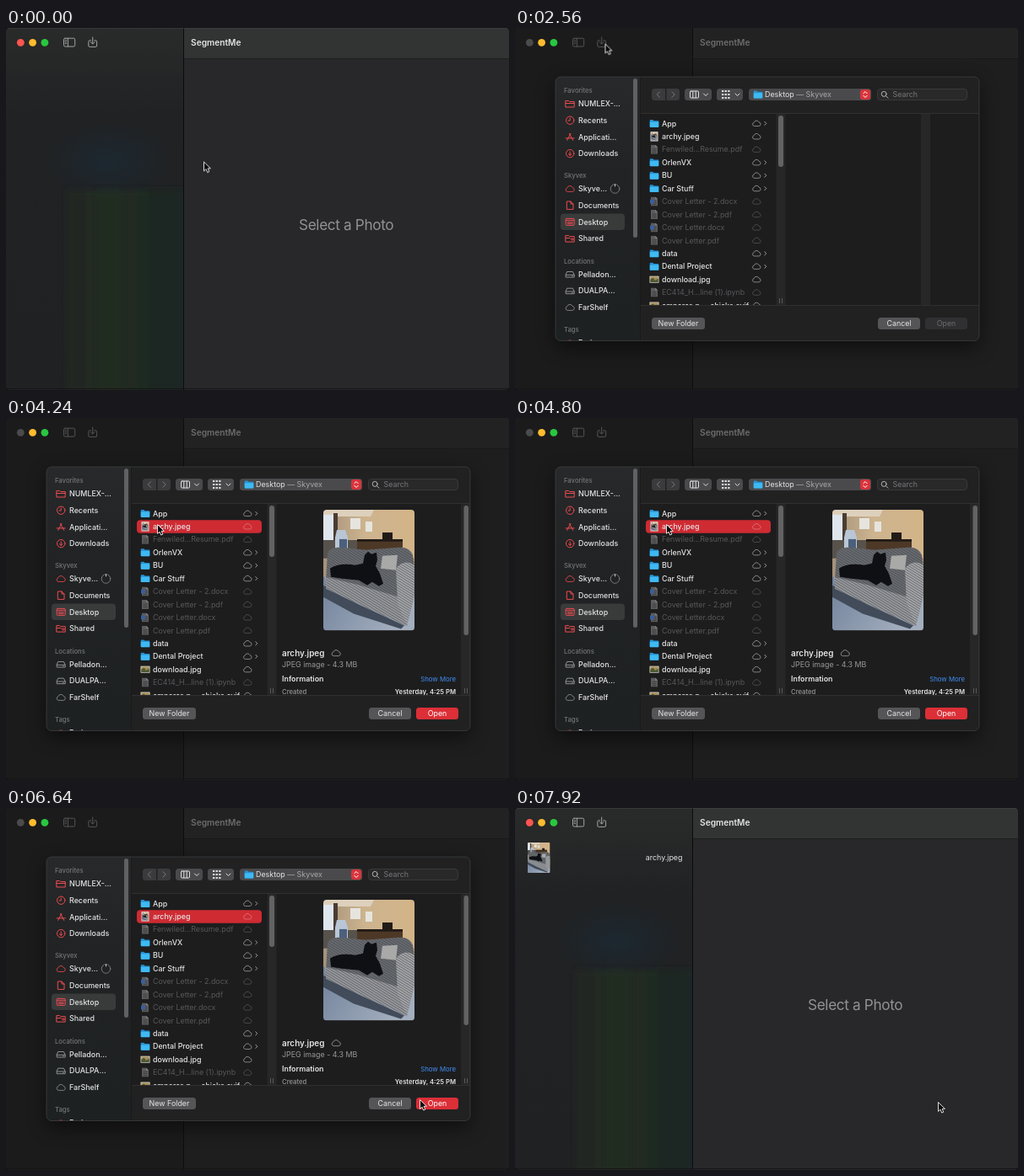
An HTML page for the animation above (8 s loop, 596 px wide and 430 px high).

```html
<!DOCTYPE html>
<html lang="en">
<head>
<meta charset="utf-8">
<title>Photo import</title>
<style>
html, body { margin: 0; width: 100%; height: 100%; overflow: hidden; background: #1e1e1f; }
svg { display: block; width: 596px; height: 430px; font: 400 8.9px Inter, Roboto, sans-serif; }
text { fill: #e4e4e5; white-space: pre; }
.b { font-weight: 600; }
.m { font-weight: 500; }
.gray { fill: #98989a; }
.off { fill: #58585a; }
.head { font-size: 7.7px; font-weight: 500; fill: #747577; }
.small { font-size: 7.7px; }
.mid { text-anchor: middle; }
.end { text-anchor: end; }
.title { font-size: 10.2px; font-weight: 600; }
.prompt { font-size: 17.2px; letter-spacing: -.35px; fill: #929294; }
.line { fill: none; stroke-width: 1; stroke-linecap: round; stroke-linejoin: round; }

.cursor, .hover, .modal, .sheet, .picked, .empty, .preview, .row { animation: 8s linear infinite; }
.cursor { animation-name: travel; }
.hover { animation-name: hover; }
.modal { animation-name: modal; }
.sheet { animation-name: sheet; transform-origin: 299px 215px; }
.picked { animation-name: picked; }
.preview { animation-name: preview; }
.empty { animation-name: empty; }
.row { animation-name: row; }

@keyframes travel {
  0%, 0.9% { transform: translate(234px, 158.5px); }
  1% { transform: translate(222px, 148px); }
  2% { transform: translate(172px, 102px); }
  3%, 4.9% { transform: translate(131px, 66px); }
  5%, 6.9% { transform: translate(115px, 42px); }
  7% { transform: translate(111px, 30px); }
  10%, 34% { transform: translate(106.5px, 18.5px); animation-timing-function: ease-in-out; }
  44%, 61% { transform: translate(179px, 126px); animation-timing-function: ease-in-out; }
  71%, 73% { transform: translate(288px, 197px); animation-timing-function: ease-in-out; }
  82%, 84% { transform: translate(490px, 346px); animation-timing-function: ease-in-out; }
  88%, 100% { transform: translate(501px, 349px); }
}
@keyframes hover { 0%, 7.9% { opacity: 0; } 8%, 29% { opacity: 1; } 30%, 100% { opacity: 0; } }
@keyframes modal { 0%, 28.9% { opacity: 0; } 31%, 95% { opacity: 1; } 97%, 100% { opacity: 0; } }
@keyframes sheet {
  0%, 28.9% { opacity: 0; transform: scale(.94); }
  31.5%, 95% { opacity: 1; transform: none; }
  97%, 100% { opacity: 0; transform: scale(.97); }
}
@keyframes picked { 0%, 51.9% { opacity: 0; } 52%, 100% { opacity: 1; } }
@keyframes empty { 0%, 51.9% { opacity: 1; } 52%, 100% { opacity: 0; } }
@keyframes preview { 0%, 52.9% { opacity: 0; } 53%, 100% { opacity: 1; } }
@keyframes row { 0%, 96.9% { opacity: 0; } 97%, 100% { opacity: 1; } }
</style>
</head>
<body>
<svg viewBox="0 0 596 430">
  <defs>
    <linearGradient id="side" x2="0" y2="1">
      <stop stop-color="#292a2a"/><stop offset=".1" stop-color="#262727"/>
      <stop offset=".24" stop-color="#202224"/><stop offset="1" stop-color="#202122"/>
    </linearGradient>
    <linearGradient id="green">
      <stop stop-color="#202622"/><stop offset=".3" stop-color="#212b21"/>
      <stop offset=".5" stop-color="#202c21"/><stop offset=".75" stop-color="#1e2624"/>
      <stop offset="1" stop-color="#1f2425"/>
    </linearGradient>
    <radialGradient id="blue">
      <stop stop-color="#1c2830"/><stop offset="1" stop-color="#1c2830" stop-opacity="0"/>
    </radialGradient>
    <linearGradient id="places-bg" x2="0" y2="1">
      <stop stop-color="#27292a"/><stop offset=".35" stop-color="#212324"/><stop offset="1" stop-color="#1e2121"/>
    </linearGradient>
    <filter id="soft" x="-20%" y="-20%" width="140%" height="140%"><feGaussianBlur stdDeviation="3"/></filter>
    <filter id="shade" x="-20%" y="-20%" width="140%" height="140%"><feGaussianBlur stdDeviation="11"/></filter>
    <linearGradient id="wall">
      <stop stop-color="#a4917a"/><stop offset=".45" stop-color="#cdb48f"/><stop offset="1" stop-color="#d3b488"/>
    </linearGradient>
    <linearGradient id="rug" x2="1" y2=".4"><stop stop-color="#71829b"/><stop offset="1" stop-color="#a3aebe"/></linearGradient>
    <pattern id="weave" width="2.6" height="2.6" patternUnits="userSpaceOnUse" patternTransform="rotate(32)">
      <path d="M0 1H2.6" stroke="#33363c" stroke-width="1" opacity=".7"/>
    </pattern>
    <clipPath id="stage"><rect width="596" height="430" rx="4"/></clipPath>
    <clipPath id="leftPane"><rect width="210" height="430"/></clipPath>
    <clipPath id="frame"><rect x="48" y="58" width="502" height="313.5" rx="6"/></clipPath>
    <clipPath id="list"><rect x="148" y="102" width="402" height="227"/></clipPath>
    <clipPath id="photoBox"><rect width="108" height="144" rx="4"/></clipPath>

    <symbol id="photo" viewBox="0 0 108 144" preserveAspectRatio="none">
      <g clip-path="url(#photoBox)">
        <rect width="108" height="144" fill="url(#wall)"/>
        <path d="M0 0H60L56 8H0Z" fill="#ddd0bc"/>
        <path d="M0 6H12V50H0Z" fill="#dfe6ee"/>
        <path d="M12 4H17V52H12Z" fill="#4a3c32"/>
        <path d="M32 10H44V23H32ZM50 14H58V26H50Z" fill="#e6e4de"/>
        <path d="M0 36H44V58H0Z" fill="#57524c"/>
        <path d="M40 36H94V56H40Z" fill="#4d3826"/>
        <path d="M40 35H94V38H40ZM70 27H82V37H70Z" fill="#211b17"/>
        <path d="M16 24H26L29 33V54H14V33Z" fill="#b9c6d6"/>
        <rect x="19" y="35" width="9" height="18" fill="#4c607c"/>
        <path d="M0 80H108V144H0Z" fill="url(#rug)"/>
        <path d="M0 90L40 112 96 138 92 142 36 124 0 104Z" fill="#414b5a"/>
        <path d="M5 52Q8 44 20 45L50 48 90 45Q102 44 106 54L108 70 92 111 3 90Z" fill="#6f7276"/>
        <path d="M2 80L40 89 90 104 100 139 40 112 3 94Z" fill="#a3a5a8"/>
        <path d="M86 70Q96 58 108 66V102L99 138 88 112Z" fill="#b2b3b5"/>
        <path d="M5 52Q8 44 20 45L50 48 90 45Q102 44 108 60V102L99 139 40 112 2 94Z" fill="url(#weave)"/>
        <path d="M70 55L88 54 86 72 68 70Z" fill="#a9a9a8"/>
        <path d="M8 70Q18 63 38 66L47 64 49 54 53 50 57 53 63 51 64 60 62 67 67 76 71 88 66 91 58 86 52 90 42 84 22 82 9 80Z" fill="#0f1014"/>
      </g>
    </symbol>
    <symbol id="cloud" viewBox="0 0 12 9" overflow="visible">
      <path d="M3.1 7.8A2.3 2.3 0 0 1 2.8 3.3A3.2 3.2 0 0 1 8.8 3A2.45 2.45 0 0 1 9 7.8Z" fill="none" stroke="currentColor" stroke-width=".8"/>
    </symbol>
    <symbol id="folder" viewBox="0 0 11 10">
      <path d="M0 1.8Q0 .6 1.2 .6H3.8L5 1.8H9.9Q11 1.8 11 3V8.4Q11 9.5 9.9 9.5H1.1Q0 9.5 0 8.4Z" fill="#2493d6"/>
      <path d="M0 3.2H11V8.4Q11 9.5 9.9 9.5H1.1Q0 9.5 0 8.4Z" fill="#3fb9f2"/>
    </symbol>
    <symbol id="doc" viewBox="0 0 9 11">
      <path d="M.5 0H5.7L8.5 2.8V11H.5Z" fill="#727274"/>
      <path d="M5.7 0V2.8H8.5Z" fill="#a5a5a6"/>
      <path d="M2 5H7M2 7H7M2 9H7" stroke="#454547" stroke-width=".8"/>
    </symbol>
  </defs>

  <rect width="596" height="430" fill="#0c0c0d"/>
  <g clip-path="url(#stage)">
    <g clip-path="url(#leftPane)">
      <rect width="210" height="430" fill="url(#side)"/>
      <rect x="72" y="192" width="150" height="250" fill="url(#green)" filter="url(#soft)"/>
      <rect x="108" y="192" width="30" height="250" fill="#232f20" filter="url(#soft)" opacity=".75"/>
      <ellipse cx="122" cy="158" rx="75" ry="45" fill="url(#blue)"/>
    </g>
    <rect x="210" width="386" height="430" fill="#28282a"/>
    <rect x="210" width="386" height="36" fill="#323433"/>
    <path d="M211 36.5H596" stroke="#1d1d1e"/>
    <path d="M210.5 0V430" stroke="#0b0b0c"/>
    <path d="M0 .5H596" stroke="#444546" opacity=".55"/>
    <rect class="hover" x="93" y="9" width="19.5" height="16.5" rx="3.5" fill="#393a3a"/>
    <circle cx="17.3" cy="17.3" r="4.4" fill="#fe5550"/>
    <g id="tools" class="line" stroke="#a2a3a3">
      <rect x="68.5" y="12.2" width="13.2" height="9.8" rx="1.6"/>
      <path d="M73.4 12.2V22M70.2 14.6H71.6M70.2 16.6H71.6M70.2 18.6H71.6"/>
      <path d="M100.6 14.8H99.2Q97.8 14.8 97.8 16.2V21Q97.8 22.4 99.2 22.4H106.2Q107.6 22.4 107.6 21V16.2Q107.6 14.8 106.2 14.8H104.8M102.7 11V18.8M100.3 16.6L102.7 19 105.1 16.6"/>
    </g>
    <text class="title" x="219" y="20.8">SegmentMe</text>
    <text class="prompt" x="347" y="240">Select a Photo</text>
    <g class="row">
      <use href="#photo" x="15" y="41" width="26.5" height="36"/>
      <text class="end" x="198.5" y="62.3">archy.jpeg</text>
    </g>

    <g class="modal">
      <rect width="596" height="430" fill="#1b1b1c"/>
      <rect x="211" width="385" height="430" fill="#1e1e1f"/>
      <rect x="211" width="385" height="36" fill="#222223"/>
      <path d="M211 36.5H596" stroke="#191919"/>
      <path d="M210.5 0V430" stroke="#0e0e0e"/>
      <circle cx="17.3" cy="17.3" r="4.4" fill="#4b4b4c"/>
      <use href="#tools" opacity=".42"/>
      <text class="title" x="219" y="20.8" style="fill:#6c6c6d">SegmentMe</text>
    </g>
    <circle cx="31.6" cy="17.3" r="4.4" fill="#febc2e"/>
    <circle cx="45.9" cy="17.3" r="4.4" fill="#29c73f"/>
    <path d="M0 428.5H596" stroke="#161617"/>

    <g class="sheet">
      <rect x="48" y="64" width="502" height="316" rx="8" fill="#000" opacity=".5" filter="url(#shade)"/>
      <g clip-path="url(#frame)">
        <rect x="48" y="58" width="502" height="314" fill="#212122"/>
        <rect x="48" y="58" width="100" height="314" fill="url(#places-bg)"/>
        <rect x="148" y="102" width="402" height="227" fill="#1d1d1e"/>
        <path d="M148 101.5H550M148 329.5H550" stroke="#303031"/>
        <path d="M148.5 58V372" stroke="#1a1a1b"/>
        <rect x="140" y="60" width="5" height="189" rx="2.5" fill="#606162"/>
        <rect x="54" y="220.5" width="76" height="19.5" rx="4" fill="#393b3b"/>
        <g id="places"></g>

        <path d="M165.5 72H178V86H165.5Q162 86 162 82.5V75.5Q162 72 165.5 72ZM179.5 72H191.5Q195 72 195 75.5V82.5Q195 86 191.5 86H179.5Z" fill="#3b3b3d"/>
        <g fill="#4a4a4c">
          <rect x="201" y="72" width="32" height="14" rx="3.5"/>
          <rect x="239" y="72" width="31" height="14" rx="3.5"/>
          <rect x="277" y="72" width="145" height="14" rx="3.5"/>
        </g>
        <path class="line" d="M171.5 75.7L168.3 79 171.5 82.3M186 75.7L189.2 79 186 82.3" stroke="#77777a"/>
        <g class="line" stroke="#dededf">
          <rect x="207.5" y="75" width="10" height="8" rx="1"/>
          <path d="M210.8 75V83M214.2 75V83M223.5 78L226 80.5 228.5 78M261 78L263.5 80.5 266 78"/>
        </g>
        <path d="M245 75H254.5M245 79H254.5M245 83H254.5" stroke="#dededf" stroke-width="2.2" stroke-dasharray="2.3 1.3"/>
        <use href="#folder" x="282.5" y="74" width="11" height="10"/>
        <text x="296" y="82.3">Desktop <tspan fill="#a8a8aa">— Skyvex</tspan></text>
        <rect x="409" y="73" width="12" height="12" rx="3" fill="#d9333b"/>
        <path class="line" d="M412.8 77.7L415 75.5 417.2 77.7M412.8 80.3L415 82.5 417.2 80.3" stroke="#fff"/>
        <rect x="429.5" y="72.5" width="106" height="13" rx="3.5" fill="#29292a" stroke="#39393b"/>
        <g class="line" stroke="#b5b5b7"><circle cx="437.2" cy="78.4" r="3"/><path d="M439.5 80.7L442 83.2"/></g>
        <text x="447.5" y="82.3" style="fill:#77777a">Search</text>

        <g clip-path="url(#list)">
          <rect class="empty" x="481" y="102" width="11" height="227" fill="#272728"/>
          <g id="files"></g>
          <g class="picked">
            <rect x="155" y="121.3" width="148" height="15.5" rx="4" fill="#cf2b33"/>
            <g id="chosen"></g>
          </g>
          <rect x="309.5" y="102" width="11" height="227" fill="#272728"/>
          <rect x="312" y="104" width="6" height="61" rx="3" fill="#636364"/>
          <path d="M313.5 321V327M316.5 321V327" stroke="#59595a"/>
          <g class="picked">
            <rect x="539" y="102" width="11" height="227" fill="#272728"/>
            <path d="M543.5 321V327M546.5 321V327" stroke="#59595a"/>
          </g>
          <g class="preview">
            <rect x="542.5" y="104" width="5.5" height="154" rx="2.7" fill="#636364"/>
            <use href="#photo" x="376" y="109" width="108" height="143.5"/>
            <text class="b" x="327" y="282.5" style="font-size:9.9px">archy.jpeg</text>
            <use href="#cloud" x="385" y="274.5" width="12.5" height="9.4" color="#9a9a9c"/>
            <text class="gray" x="327" y="296.3">JPEG image - 4.3 MB</text>
            <text class="b" x="327" y="313.3">Information</text>
            <text class="end" x="533" y="313.2" style="font-size:7.8px;fill:#3f8df2">Show More</text>
            <text class="gray m small" x="327" y="328.3">Created</text>
            <text class="end b small" x="533" y="328.3">Yesterday, 4:25 PM</text>
          </g>
        </g>

        <rect x="162" y="344" width="63" height="14" rx="3.5" fill="#555557"/>
        <text class="mid" x="193.5" y="354.2">New Folder</text>
        <rect x="430" y="344" width="50" height="14" rx="3.5" fill="#555557"/>
        <text class="mid" x="455" y="354.2">Cancel</text>
        <rect x="486" y="344" width="50" height="14" rx="3.5" fill="#303032"/>
        <text class="mid" x="511" y="354.2" style="fill:#6b6b6d">Open</text>
        <g class="picked">
          <rect x="486" y="344" width="50" height="14" rx="3.5" fill="#dc2f37"/>
          <text class="mid" x="511" y="354.2" style="fill:#fff">Open</text>
        </g>
      </g>
      <rect x="48" y="58" width="502" height="313.5" rx="6" fill="none" stroke="#3e3f40" stroke-width=".8"/>
    </g>

    <g class="cursor">
      <path d="M.5 .5V11.4L3 9.1 4.7 13 6.8 12.1 5.1 8.3H8.4Z" fill="#080808" stroke="#f4f4f4" stroke-width=".9" stroke-linejoin="round"/>
    </g>
  </g>
</svg>
<script>
const byId = id => document.getElementById(id);
const use = (id, x, y, w, h, color = '') =>
  `<use href="#${id}" x="${x}" y="${y}" width="${w}" height="${h}" color="${color}"/>`;
const label = (x, y, str, cls = '') => `<text x="${x}" y="${y}" class="${cls}">${str}</text>`;

// Sidebar glyphs, drawn around their own centre
const glyph = {
  folder: '<path d="M-5-3.5H-1.5L-.5-2.5H5V4H-5ZM-5-.5H5"/>',
  clock: '<circle r="4.7"/><path d="M0-2.8V.3H-2.2"/>',
  apps: '<path d="M-3.5 4L.8-4M3.5 4L-.8-4M-5 1.5H5"/>',
  down: '<circle r="4.7"/><path d="M0-2.3V2.3M-1.9 .5L0 2.3 1.9 .5"/>',
  doc: '<path d="M-3.5-4.7H.8L3.8-1.7V4.7H-3.5ZM.8-4.7V-1.7H3.8"/>',
  desk: '<rect x="-5" y="-4" width="10" height="8" rx="1"/><path d="M-5-2H5M-3 2H3M-3 .3H3"/>',
  share: '<path d="M-5-3.5H-1.5L-.5-2.5H5V4H-5ZM-5-.5H0"/><circle cx="2.5" cy=".8" r="1.2"/>',
  disk: '<path d="M-3.2-3H3.2L5 .8V3.5H-5V.8ZM-5 .8H5M2.5 2.2H3"/>'
};
const red = '#ee4a50', dim = '#8f9092';
const sections = [
  ['Favorites', 74.5, 90, red, [['folder', 'NUMLEX-…'], ['clock', 'Recents'], ['apps', 'Applicati…'], ['down', 'Downloads']]],
  ['Skyvex', 175.3, 191, red, [['cloud', 'Skyve…'], ['doc', 'Documents'], ['desk', 'Desktop'], ['share', 'Shared']]],
  ['Locations', 277, 292.5, dim, [['disk', 'Pelladon…'], ['disk', 'DUALPA…'], ['cloud', 'FarShelf']]]
];
let places = '';
for (const [title, headY, top, color, items] of sections) {
  places += label(58, headY + 2.8, title, 'head');
  items.forEach(([icon, name], i) => {
    const y = top + i * 19.7;
    places += icon === 'cloud'
      ? use('cloud', 59, y - 4.6, 12.4, 9.3, color)
      : `<g class="line" stroke="${color}" transform="translate(65.2 ${y})">${glyph[icon]}</g>`;
    places += label(75, y + 3.2, name, 'm');
  });
}
places += '<circle class="line" cx="118.5" cy="191" r="5.3" stroke="#77787a"/><path class="line" d="M118.5 188V185.7" stroke="#c5c5c6"/>';
places += label(58, 360.8, 'Tags', 'head') + '<circle cx="65" cy="374.5" r="4" fill="#ee4a50"/>' + label(75, 376.7, 'Red', 'm');
byId('places').innerHTML = places;

const files = [
  ['folder', 'App'], ['pic', 'archy.jpeg'], ['doc', 'Fenwiled…Resume.pdf'],
  ['folder', 'OrlenVX'], ['folder', 'BU'], ['folder', 'Car Stuff'],
  ['word', 'Cover Letter - 2.docx'], ['doc', 'Cover Letter - 2.pdf'],
  ['word', 'Cover Letter.docx'], ['doc', 'Cover Letter.pdf'],
  ['folder', 'data'], ['folder', 'Dental Project'], ['land', 'download.jpg'],
  ['doc', 'EC414_H…line (1).ipynb'], ['land', 'emperor-p…-chicks.avif']
];
const icons = {
  folder: y => use('folder', 159.5, y - 5, 11, 10),
  doc: y => `<g opacity=".75">${use('doc', 160.5, y - 5.5, 9, 11)}</g>`,
  word: y => icons.doc(y) + `<rect x="160" y="${y - 2.5}" width="5" height="5" fill="#3a5f99"/>`,
  pic: y => `<rect x="160.5" y="${y - 5.7}" width="9" height="11.4" fill="#dcdcdc"/>` + use('photo', 161.2, y - 5, 7.6, 10),
  land: y => `<rect x="159.5" y="${y - 4}" width="11" height="8" fill="#e0ddd2"/><rect x="160.3" y="${y - 3.2}" width="9.4" height="6.4" fill="#a58d55"/><path d="M160.3 ${y + 3.2}V${y}L163.5 ${y - 2} 166 ${y + 1} 169.7 ${y - 1}V${y + 3.2}Z" fill="#4e5a35"/>`
};
const fileRow = ([kind, name], i, cloud) => {
  const y = +(113.4 + i * 15.44).toFixed(2);
  const locked = kind === 'doc' || kind === 'word';
  return icons[kind](y) + label(174, y + 3.2, name, locked ? 'off' : 'm') +
    use('cloud', 280.5, y - 4.4, 11.6, 8.7, cloud || (locked ? '#555557' : '#a0a0a2')) +
    (kind === 'folder' ? `<path class="line" d="M295.8 ${y - 2}L297.8 ${y} 295.8 ${y + 2}" stroke="#a0a0a2"/>` : '');
};
byId('files').innerHTML = files.map((file, i) => fileRow(file, i)).join('');
byId('chosen').innerHTML = fileRow(files[1], 1, '#e2797e');
</script>
</body>
</html>
```
